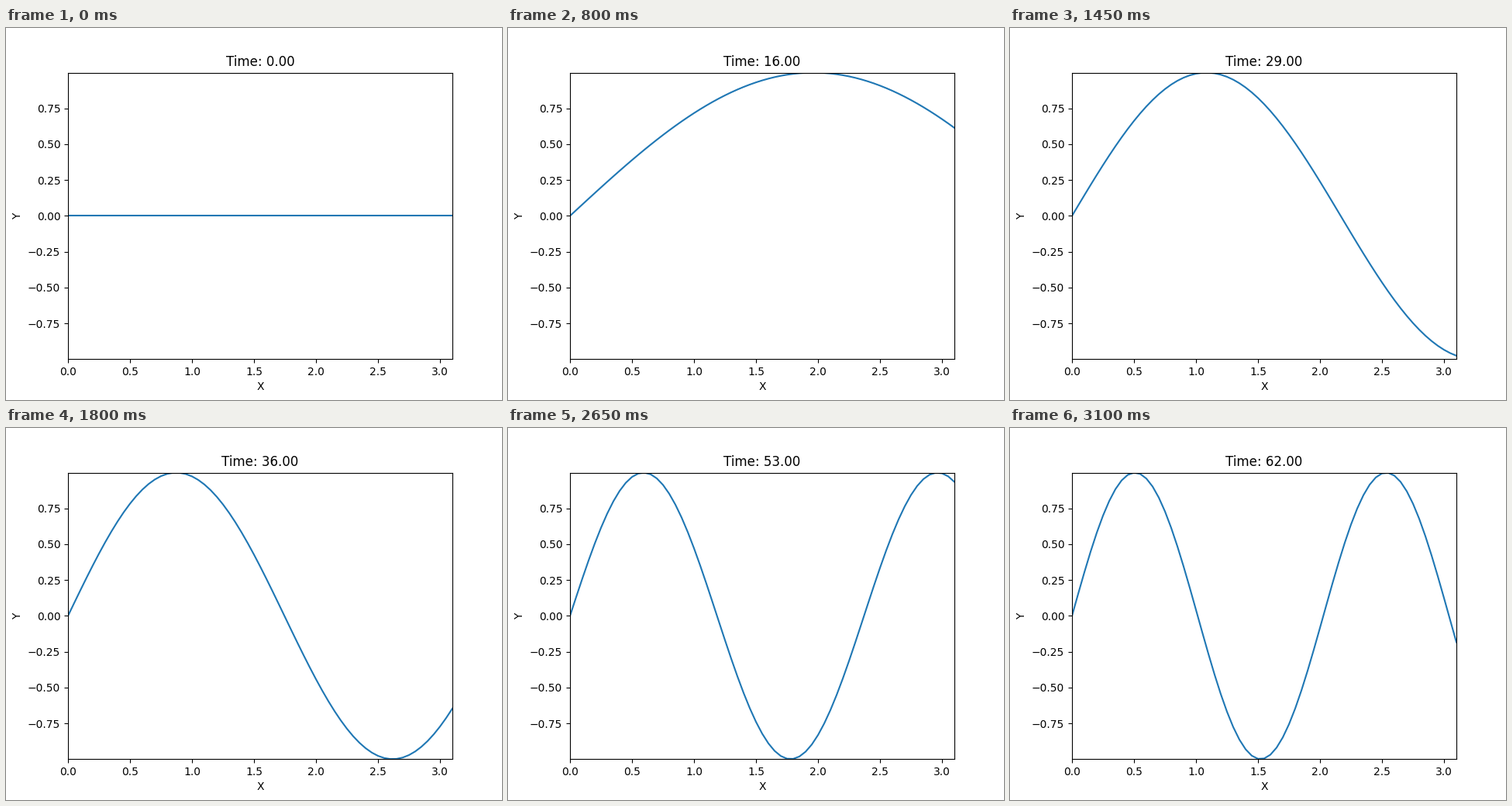
Recreate the animation shown at these times as a matplotlib script. Size 640 by 480 pixels, loop 3150 ms.

```python
import numpy as np
import matplotlib.pyplot as plt
from matplotlib.animation import FuncAnimation

STEP = 0.05
x = np.arange(0, np.pi, STEP)
waves = np.sin(np.outer(x, x))  # one row per time step

fig, ax = plt.subplots(figsize=(6.4, 4.8), dpi=100)
line, = ax.plot(x, waves[0])
ax.set_xlim(x[0], x[-1])
ax.set_ylim(waves.min(), waves.max())
ax.set_xlabel("X")
ax.set_ylabel("Y")
title = ax.set_title("Time: 0.00")


def update(i):
    line.set_ydata(waves[i])
    title.set_text(f"Time: {i:.2f}")
    return line, title


anim = FuncAnimation(fig, update, frames=len(x), interval=50,
                     repeat=True, repeat_delay=0, blit=False)
plt.show()
```
